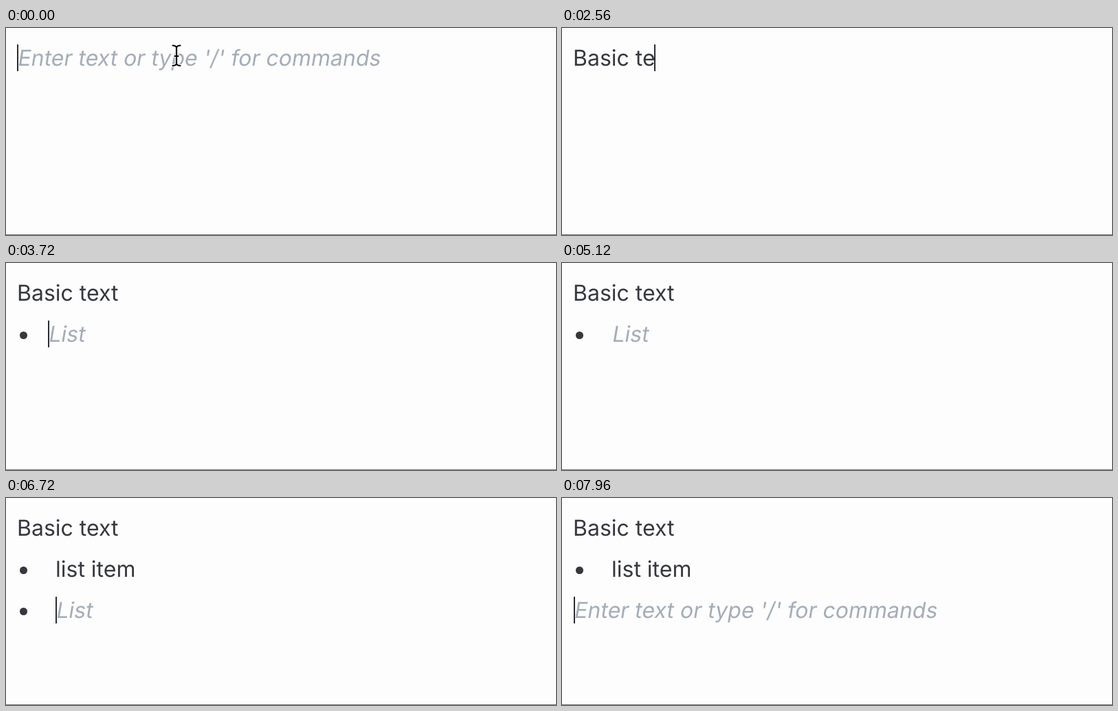
Animation of 800 by 302 pixels, one loop 8 s. Source, as an HTML page:

```html
<!DOCTYPE html>
<html lang="en">
<head>
<meta charset="utf-8">
<title>Block editor</title>
<style>
  html, body { margin: 0; width: 100%; height: 100%; overflow: hidden; background: #fdfdfd; }
  #stage {
    position: relative; width: 800px; height: 302px; overflow: hidden;
    font: 32px/39px Inter, sans-serif; font-optical-sizing: none;
    text-rendering: geometricPrecision;
    color: #36383e; background: #fdfdfd;
  }
  #stage > * { position: absolute; }
  .line { left: 16px; white-space: pre; transform-origin: 0 31px; }
  .line.hint { color: #a5adb9; }
  .bullet { left: 20px; width: 10.6px; height: 10.6px; border-radius: 50%; background: #36383e; }
  #caret { left: 0; top: 24px; width: 2px; height: 39px; background: #2b2d33; }
  #pointer { left: 238px; top: 22px; fill: none; stroke-linecap: round; stroke-linejoin: round; }
  #edge { left: 0; top: 301px; width: 800px; height: 1px; background: #737373; }
</style>
</head>
<body>
<div id="stage">
  <div class="line"></div>
  <div class="line"></div>
  <div class="line"></div>
  <div class="bullet" style="top:100px"></div>
  <div class="bullet" style="top:160px"></div>
  <div id="caret"></div>
  <svg id="pointer" width="22" height="38">
    <defs>
      <path id="beam" d="M4.5 3.500Q9 3.500 10 6.500Q11 3.500 15.500 3.500M10 6.500V30M4.500 33Q9 33 10 30Q11 33 15.500 33M7.500 19H12.500"/>
    </defs>
    <use href="#beam" stroke="#fff" stroke-width="4.500"/>
    <use href="#beam" stroke="#000" stroke-width="2.200"/>
  </svg>
  <div id="edge"></div>
</div>
<script>
const LOOP = 8000, STEP = 40, LEFT = 16, INDENT = 56, ROW = 60, SLANT = -9.4;
const PROMPT = "Enter text or type '/' for commands";
const ENTER_1 = 3160, DASH = 3560, LIST = 3600, ENTER_2 = 6720, UNLIST = 7720;

const basicKeys = [1760, 1920, 2000, 2160, 2280, 2360, 2520, 2560, 2760, 2840];
const itemKeys = [5600, 5840, 5880, 5960, 6040, 6080, 6280, 6360, 6480];
const caretOff = [[120, 600], [1120, 1600], [4120, 4640], [5120, 5600], [7200, 7720]];

const lines = [...document.querySelectorAll('.line')];
const bullets = [...document.querySelectorAll('.bullet')];
const caret = document.getElementById('caret');
const pointer = document.getElementById('pointer');
lines.forEach((el, row) => el.style.top = 24 + row * ROW + 'px');

// cubic-bezier(.25, .1, .25, 1), solved by bisection
function ease(x) {
  if (x <= 0) return 0;
  if (x >= 1) return 1;
  const curve = (s, a, b) => 3 * s * (1 - s) ** 2 * a + 3 * s * s * (1 - s) * b + s ** 3;
  let lo = 0, hi = 1;
  for (let i = 0; i < 24; i++) {
    const mid = (lo + hi) / 2;
    if (curve(mid, .25, .25) < x) lo = mid; else hi = mid;
  }
  return curve(lo, .1, 1);
}

const slide = (t, start) => ease((t - start) / 250);
const typed = (text, keys, t) => text.slice(0, keys.filter(k => k <= t).length);
const show = (el, on) => el.style.visibility = on ? 'visible' : 'hidden';

// Fills a row and returns the caret position in it. Hints are the upright face, slanted.
function setLine(row, text, hint, indent = 0) {
  const el = lines[row], content = text || hint;
  if (el.textContent !== content) el.textContent = content;
  el.classList.toggle('hint', !text);
  el.style.transform = `translateX(${indent}px)` + (text ? '' : ` skewX(${SLANT}deg)`);
  return text ? Math.round(LEFT + indent + el.getBoundingClientRect().width - 1.3)
              : Math.round(LEFT + indent);
}

function draw(t) {
  const isList = t > LIST, isPlainAgain = t >= UNLIST;
  const row = t < ENTER_1 ? 0 : t < ENTER_2 ? 1 : 2;

  const ends = [
    setLine(0, typed('Basic text', basicKeys, t), PROMPT),
    row < 1 ? setLine(1, '', '')
      : isList ? setLine(1, typed('list item', itemKeys, t), 'List', INDENT * slide(t, 3595))
      : setLine(1, t >= DASH ? '-' : '', PROMPT),
    row < 2 ? setLine(2, '', '')
      : setLine(2, '', isPlainAgain ? PROMPT : 'List', INDENT * (1 - slide(t, 7750)))
  ];

  show(bullets[0], isList);
  show(bullets[1], row === 2 && !isPlainAgain);
  show(pointer, t < 280);
  show(caret, !caretOff.some(([from, to]) => t >= from && t < to));
  caret.style.transform = `translate(${ends[row]}px, ${row * ROW}px)`;
}

function tick() {
  draw(Math.floor(performance.now() % LOOP / STEP) * STEP);
  requestAnimationFrame(tick);
}
tick();
</script>
</body>
</html>
```
